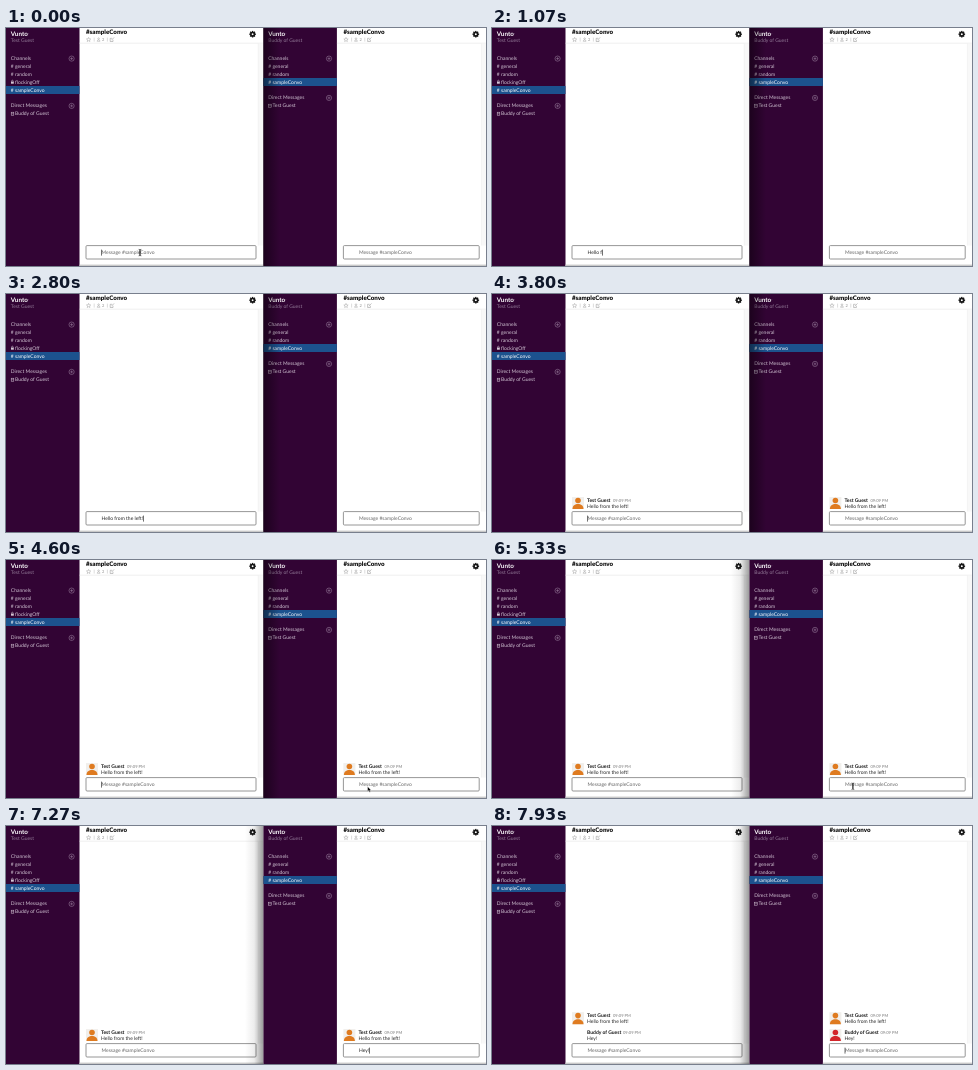
Animation of 480x238 px, one loop 8 s. Source, as an HTML page:

```html
<!DOCTYPE html>
<html lang="en">
<head>
<meta charset="utf-8">
<title>Two chat windows</title>
<style>
  html, body { margin: 0; width: 100%; height: 100%; overflow: hidden; background: #fff; }
  svg { display: block; width: 100vw; height: 100vh; }
  text { font: 5px Lato, sans-serif; white-space: pre; text-rendering: geometricPrecision; }
</style>
</head>
<body>
<svg id="stage" viewBox="0 0 480 238" xmlns="http://www.w3.org/2000/svg">
  <defs>
    <linearGradient id="fallRight">
      <stop offset="0" stop-color="#000" stop-opacity=".45"/>
      <stop offset="1" stop-color="#000" stop-opacity="0"/>
    </linearGradient>
    <linearGradient id="fallLeft">
      <stop offset="0" stop-color="#000" stop-opacity="0"/>
      <stop offset=".5" stop-color="#000" stop-opacity=".07"/>
      <stop offset="1" stop-color="#000" stop-opacity=".38"/>
    </linearGradient>
  </defs>
</svg>
<script>
const LOOP = 8000;
const HOST = 'Test Guest', BUDDY = 'Buddy of Guest';
const stage = document.getElementById('stage');

function add(parent, tag, attrs, content) {
  const el = document.createElementNS('http://www.w3.org/2000/svg', tag);
  for (const k in attrs) el.setAttribute(k, attrs[k]);
  if (content !== undefined) el.textContent = content;
  parent.appendChild(el);
  return el;
}
const rect = (p, x, y, width, height, fill, more) =>
  add(p, 'rect', { x, y, width, height, fill, ...more });
const label = (p, x, y, str, fill, style = '') => add(p, 'text', { x, y, fill, style }, str);
const line = (p, d, stroke, width = .5) =>
  add(p, 'path', { d, stroke, 'stroke-width': width, fill: 'none' });
const show = (el, on) => el.setAttribute('visibility', on ? 'inherit' : 'hidden');

function plus(p, y) {
  add(p, 'circle', { cx: 65.6, cy: y, r: 2.6, fill: 'none', stroke: '#a58ca9', 'stroke-width': .5 });
  line(p, `M64.2 ${y}h2.8M65.6 ${y - 1.4}v2.8`, '#a58ca9');
}

function sidebar(p, user, friend, rooms) {
  const soft = '#d3c6d5', dim = '#937b98';
  rect(p, 0, 0, 73.5, 238, '#320434');
  label(p, 4.8, 7.8, 'Vunto', '#fff', 'font-size:6.3px;font-weight:700');
  line(p, 'M20.7 5.4l.9 .9l.9-.9', dim);
  label(p, 4.8, 14.4, user, dim);
  label(p, 4.8, 31.8, 'Channels', soft);
  plus(p, 30.6);
  rooms.forEach((room, i) => {
    const y = 39.8 + 8 * i, active = i === rooms.length - 1;
    const ink = active ? '#fff' : soft;
    if (active) rect(p, 0, y - 5.8, 73.5, 8, '#1c528e');
    if (room === 'flockingOff') {
      rect(p, 5, y - 2.2, 2.8, 2.1, ink);
      line(p, `M5.6 ${y - 2}v-.8a.8 .8 0 0 1 1.6 0v.8`, ink);
    } else label(p, 4.8, y, '#', ink);
    label(p, 9, y, room, ink);
  });
  const base = 47.3 + 8 * rooms.length;
  label(p, 4.8, base, 'Direct Messages', soft);
  plus(p, base - 1.4);
  rect(p, 5.2, base + 4.9, 2.6, 3, 'none', { stroke: soft, 'stroke-width': .5 });
  line(p, `M5.2 ${base + 6.4}h2.6`, soft, .4);
  label(p, 9, base + 8, friend, soft);
}

function gear(p, x) {
  const g = add(p, 'g', { transform: `translate(${x} 6.2)` });
  for (let a = 0; a < 360; a += 45)
    rect(g, -.7, -3.3, 1.4, 2, '#161616', { transform: `rotate(${a})` });
  add(g, 'circle', { r: 1.8, fill: 'none', stroke: '#161616', 'stroke-width': 1.5 });
}

function header(p, width) {
  const ink = '#8d8d8d';
  label(p, 80, 5.6, '#sampleConvo', '#111', 'font-size:6.2px;font-weight:900');
  let star = '';
  for (let i = 0; i < 10; i++) {
    const r = i % 2 ? 1 : 2.3, a = i * Math.PI / 5;
    star += `${82.6 + r * Math.sin(a)},${11.7 - r * Math.cos(a)} `;
  }
  add(p, 'polygon', { points: star, fill: 'none', stroke: ink, 'stroke-width': .4 });
  line(p, 'M88.2 9.6v4M101.4 9.6v4', '#aaa', .4);
  add(p, 'circle', { cx: 92.6, cy: 10.6, r: .8, fill: 'none', stroke: ink, 'stroke-width': .4 });
  line(p, 'M91.2 13.3a1.4 1.5 0 0 1 2.8 0z', ink, .4);
  label(p, 96, 13.2, '2', ink, 'font-size:4px');
  line(p, 'M107 11.8v1.7h-2.8v-3.2h2M105.5 12.2l2.6-2.8', ink);
  gear(p, width - 10.4);
  line(p, `M73.5 15.2H${width}`, '#e6e6e6', .6);
  rect(p, width - 4.8, 15.5, 4.8, 202, '#f8f8f8');
  line(p, `M${width - 4.8} 15.5V217.5`, '#e9e9e9', .4);
}

function message(p, y, name, time, body, color) {
  const g = add(p, 'g', {});
  label(g, 95, y, name, '#161616', 'font-weight:700');
  label(g, time, y, '09:09 PM', '#777', 'font-size:4.1px');
  label(g, 95, y + 6, body, '#222');
  if (color) {
    rect(g, 80, y - 4.5, 12, 12, '#f1efec');
    add(g, 'circle', { cx: 86, cy: y - 1.1, r: 2.8, fill: color });
    add(g, 'path', { d: `M80.5 ${y + 7.5}c0-3.6 2.6-5 5.5-5s5.5 1.4 5.5 5z`, fill: color });
  }
  return g;
}

function chat(x, width, user, friend, rooms, replyColor) {
  const p = add(stage, 'g', { transform: `translate(${x} 0)` });
  rect(p, 0, 0, width, 238, '#fff');
  sidebar(p, user, friend, rooms);
  header(p, width);
  const first = message(p, 207.6, HOST, 121, 'Hello from the left!', '#df7b20');
  const reply = message(p, 207.6, BUDDY, 131, 'Hey!', replyColor);
  rect(p, 80, 217.6, width - 87, 13.4, '#fff', { rx: 1, stroke: '#7d7d7d', 'stroke-width': .8 });
  rect(p, 73.5, 236.6, width - 73.5, 1.4, '#c9c9c9');
  const input = label(p, 95.5, 226.4, '', '#222');
  const caret = rect(p, 0, 221.6, .6, 6, '#111');
  return { first, reply, input, caret };
}

const left = chat(0, 257, HOST, BUDDY,
  ['general', 'random', 'flockingOff', 'sampleConvo'], null);
const right = chat(257.4, 222.8, BUDDY, HOST,
  ['general', 'random', 'sampleConvo'], '#d3262b');

const shadeRight = rect(stage, 257, 0, 17, 238, 'url(#fallRight)');
const shadeLeft = rect(stage, 239, 0, 18.3, 238, 'url(#fallLeft)');

const beam = add(stage, 'g', {});
line(beam, 'M-1.3-3.2q1.3 0 1.3 .9v4.6q0 .9-1.3 .9M1.3-3.2q-1.3 0-1.3 .9v4.6q0 .9 1.3 .9', '#111', .7);
const arrow = add(stage, 'path', {
  d: 'M0 0v4.9l1.2-1l.8 1.8l.9-.4l-.8-1.7h1.5z',
  fill: '#000', stroke: '#fff', 'stroke-width': .35
});

const HELLO = 'Hello from the left!';
const helloKeys = [200, 470, 600, 730, 930, 1000, 1070, 1270, 1330, 1400, 1470,
  1530, 1600, 1730, 1870, 1930, 2130, 2200, 2400, 2800];
const heyKeys = [6400, 6670, 6730, 7270];
const typed = (str, keys, t) => str.slice(0, keys.filter(k => t >= k).length);
const within = (t, a, b) => t >= a && t < b;
const smooth = u => u * u * (3 - 2 * u);

function setInput(win, str, caretOn) {
  const value = str || 'Message #sampleConvo';
  if (win.input.textContent !== value) {
    win.input.textContent = value;
    win.input.setAttribute('fill', str ? '#222' : '#666');
  }
  const end = str ? win.input.getComputedTextLength() : -.2;
  win.caret.setAttribute('x', 95.5 + end);
  show(win.caret, caretOn);
}

function pointer(t) {
  let x = 134, y = 224.6, kind = '';
  if (t < 70) kind = 'beam';
  else if (within(t, 3860, 5330)) {
    const step = Math.min(1, Math.floor((t - 3860) / 66.6 + 1) / 12);
    const u = smooth(step);
    x = 134 + 227.6 * u;
    y = 224.6 + 2 * u + 5 * Math.sin(Math.PI * u);
    kind = x < 250 ? 'beam' : 'arrow';
  } else if (within(t, 5330, 6400)) {
    const u = Math.min(1, Math.floor((t - 5330) / 66.6 + 1) / 4);
    x = 361.6 - 2.8 * u;
    y = 226.6 - 1.4 * u;
    kind = 'beam';
  }
  for (const [el, name] of [[beam, 'beam'], [arrow, 'arrow']]) {
    show(el, kind === name);
    el.setAttribute('transform', `translate(${x} ${y})`);
  }
}

function draw(t) {
  setInput(left, t < 3400 ? typed(HELLO, helloKeys, t) : '', t < 4800 && !within(t, 3330, 3400));
  setInput(right, t < 7930 ? typed('Hey!', heyKeys, t) : '',
    within(t, 5730, 6270) || within(t, 6400, 7800) || t >= 7930);
  for (const win of [left, right]) {
    show(win.first, t >= 3800);
    show(win.reply, t >= 7930);
    win.first.setAttribute('transform', `translate(0 ${t >= 7930 ? -16.9 : 0})`);
  }
  show(shadeRight, t < 4800);
  show(shadeLeft, t >= 4800);
  pointer(t);
}

const start = performance.now();
function tick() {
  draw((performance.now() - start) % LOOP);
  requestAnimationFrame(tick);
}
tick();
</script>
</body>
</html>
```
